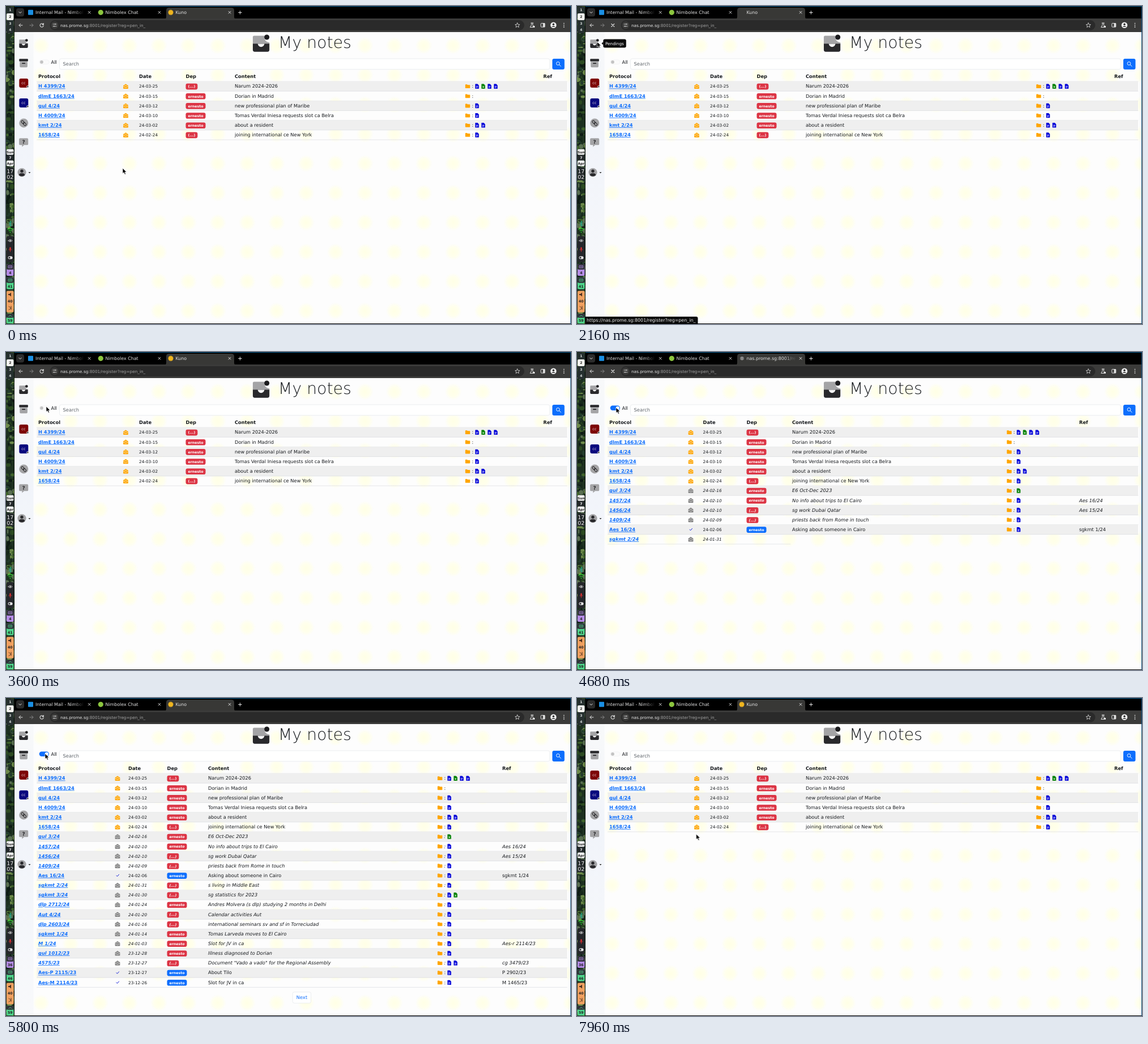
Animation, 998 px wide and 561 px high, one loop 8000 ms. Source, as an HTML page:

```html
<!DOCTYPE html>
<html lang="en">
<head>
<meta charset="utf-8">
<title>My notes</title>
<style>
html, body { margin: 0; width: 100%; height: 100%; overflow: hidden; background: #000; }
svg { display: block; width: 100vw; height: 100vh; font-family: "DejaVu Sans", sans-serif; text-rendering: geometricPrecision; }
text { white-space: pre; }
.b { font-weight: bold; }
.i { font-style: oblique; }
.m { text-anchor: middle; }
.link { font-weight: bold; fill: #0d6efd; text-decoration: underline; }
.title { font-family: "DejaVu Sans Light", "DejaVu Sans", sans-serif; font-weight: 200; }
.part { animation: 8s step-end infinite; }
.six { animation-name: six; }
.twelve { animation-name: twelve; }
.full { animation-name: full; }
.three { animation-name: three; }
.on { animation-name: on; }
.off { animation-name: off; }
.busy { animation-name: busy; }
.idle { animation-name: idle; }
.tip { animation-name: tip; }
.status { animation-name: status; }
.named { animation-name: named; }
.unnamed { animation-name: unnamed; }
.favicon { animation-name: favicon; }
.early { animation-name: early; }
.late { animation-name: late; }
.cursor { animation: cursor 8s ease-in-out infinite; }
@keyframes six { 0%, 89% { visibility: visible } 57.5% { visibility: hidden } }
@keyframes twelve { 0%, 60.5% { visibility: hidden } 57.5% { visibility: visible } }
@keyframes full { 0%, 87% { visibility: hidden } 60.5% { visibility: visible } }
@keyframes three { 0%, 89% { visibility: hidden } 87% { visibility: visible } }
@keyframes on { 0%, 83% { visibility: hidden } 53.25% { visibility: visible } }
@keyframes off { 0%, 83% { visibility: visible } 53.25% { visibility: hidden } }
@keyframes busy { 0%, 32%, 65%, 92.5% { visibility: hidden } 23%, 54%, 83.5% { visibility: visible } }
@keyframes idle { 0%, 32%, 65%, 92.5% { visibility: visible } 23%, 54%, 83.5% { visibility: hidden } }
@keyframes tip { 0%, 33% { visibility: hidden } 19.5% { visibility: visible } }
@keyframes status { 0%, 34% { visibility: hidden } 20% { visibility: visible } }
@keyframes named { 0%, 62% { visibility: visible } 57.5% { visibility: hidden } }
@keyframes unnamed { 0%, 62% { visibility: hidden } 57.5% { visibility: visible } }
@keyframes favicon {
  0%, 32%, 62%, 92.5% { visibility: visible; transform: scale(1) }
  23%, 57.5% { visibility: hidden; transform: scale(1) }
  87% { visibility: visible; transform: scale(.7) }
}
@keyframes early { 0% { visibility: visible } 64% { visibility: hidden } }
@keyframes late { 0% { visibility: hidden } 64% { visibility: visible } }
@keyframes cursor {
  0%, 1% { transform: translate(206px, 286px) }
  18.5%, 33% { transform: translate(35.5px, 63px) }
  42%, 50% { transform: translate(71px, 96px) }
  53%, 93.5% { transform: translate(69px, 98px) }
  98.5%, 100% { transform: translate(210.5px, 240px) }
}
</style>
</head>
<body>
<svg id="stage" viewBox="0 0 998 561" xmlns="http://www.w3.org/2000/svg">
  <defs>
    <radialGradient id="glow">
      <stop offset="0" stop-color="#ffffe6"/><stop offset=".55" stop-color="#ffffec"/><stop offset="1" stop-color="#ffffec" stop-opacity="0"/>
    </radialGradient>
    <pattern id="dots" x="36" y="44" width="52" height="52" patternUnits="userSpaceOnUse">
      <circle cx="26" cy="26" r="15" fill="url(#glow)"/>
    </pattern>
    <linearGradient id="side" x2="0" y2="1">
      <stop offset="0" stop-color="#f8f9fa"/><stop offset=".35" stop-color="#f1f4fa"/><stop offset="1" stop-color="#f8f9fb"/>
    </linearGradient>
    <linearGradient id="fade">
      <stop offset="0" stop-color="#000" stop-opacity="0"/><stop offset="1"/>
    </linearGradient>
    <linearGradient id="fadeTab">
      <stop offset="0" stop-color="#383836" stop-opacity="0"/><stop offset="1" stop-color="#383836"/>
    </linearGradient>
    <clipPath id="strip"><path d="M0 0h14.5v561H0z"/></clipPath>
    <g id="mail">
      <path d="M-4.4-1.3 0-4.3 4.4-1.3V3.3q0 .9-.9.9h-7q-.9 0-.9-.9z"/>
      <path d="M-2.4-1.3h4.8M-4.4.2 0 2.3 4.4.2" fill="none" stroke="#f6f6f6" stroke-width=".7"/>
    </g>
    <path id="folder" d="M-4.2-2.7q0-.7.7-.7h2.3l1 1h3.7q.7 0 .7.7v4.4q0 .7-.7.7h-7q-.7 0-.7-.7z"/>
    <path id="page" d="M-3.2-3.6q0-.6.6-.6H.9L3.3-1.8V3.6q0 .6-.6.6h-5.3q-.6 0-.6-.6z"/>
    <path id="lines" d="M-1.6-.1h3.2M-1.6 1.3h3.2M-1.6 2.6h2" stroke="#fff" stroke-width=".7"/>
    <path id="cross" d="M-1.4-.6 1.4 2.8M1.4-.6-1.4 2.8" stroke="#fff" stroke-width=".8"/>
    <g id="inbox">
      <path d="M-6.5-6.8H3.2A5 5 0 0 0 7.7-.4V1H-7.7V-5.6q0-1.2 1.2-1.2z" fill="#a4a4a6"/>
      <path d="M-7.7.6H-3.2q.8 3 3.2 3t3.2-3H7.7V6.3q0 1.8-1.8 1.8H-5.9q-1.8 0-1.8-1.8z" fill="#29292c"/>
      <circle cx="5.3" cy="-5.4" r="2.4" fill="#1c1c1f"/>
    </g>
  </defs>
</svg>
<script>
const stage = document.getElementById('stage');
const rect = (x, y, w, h, fill, rx = 0, more = '') =>
  `<rect x="${x}" y="${y}" width="${w}" height="${h}" rx="${rx}" fill="${fill}" ${more}/>`;
const disc = (x, y, r, fill) => `<circle cx="${x}" cy="${y}" r="${r}" fill="${fill}"/>`;
const line = (d, stroke, width = 1) =>
  `<path d="${d}" fill="none" stroke="${stroke}" stroke-width="${width}" stroke-linecap="round" stroke-linejoin="round"/>`;
const fillPath = (d, fill) => `<path d="${d}" fill="${fill}"/>`;
const text = (x, y, s, size = 8.32, fill = '#16191d', cls = '') =>
  `<text x="${x}" y="${y}" font-size="${size}" fill="${fill}" class="${cls}">${s}</text>`;
const use = (id, x, y, fill, scale = 1) =>
  `<use href="#${id}" transform="translate(${x} ${y}) scale(${scale})" fill="${fill}"/>`;
const part = (name, body) => `<g class="part ${name}">${body}</g>`;

// Mail state: o = open, g = read (set in italics), c = done.
const notes = `H 4399/24|o|24-03-25||Narum 2024-2026|bgbb|
dlmE 1663/24|o|24-03-15|ernesto|Dorian in Madrid||
gul 4/24|o|24-03-12|ernesto|new professional plan of Maribe|b|
H 4009/24|o|24-03-10|ernesto|Tomas Verdal Iniesa requests slot ca Belra|b|
kmt 2/24|o|24-03-02|ernesto|about a resident|bb|
1658/24|o|24-02-24||joining international ce New York|b|
gul 3/24|g|24-02-16|ernesto|E6 Oct-Dec 2023|g|
1457/24|g|24-02-10|ernesto|No info about trips to El Cairo|b|Aes 16/24
1456/24|g|24-02-10||sg work Dubai Qatar|b|Aes 15/24
1409/24|g|24-02-09||priests back from Rome in touch|b|
Aes 16/24|c|24-02-06|ernesto|Asking about someone in Cairo|b|sgkmt 1/24
sgkmt 2/24|g|24-01-31||s living in Middle East|b|
sgkmt 3/24|g|24-01-30||sg statistics for 2023|bg|
dlp 2712/24|g|24-01-24|ernesto|Andres Molvera (s dlp) studying 2 months in Delhi|b|
Aut 4/24|g|24-01-20||Calendar activities Aut|b|
dlp 2603/24|g|24-01-16||international seminars sv and sf in Torreciudad|b|
sgkmt 1/24|g|24-01-14|ernesto|Tomas Larveda moves to El Cairo|b|
M 1/24|g|24-01-03|ernesto|Slot for JV in ca|b|Aes-r 2114/23
gul 1012/23|g|23-12-28|ernesto|Illness diagnosed to Dorian|b|
4575/23|g|23-12-27||Document "Vado a vado" for the Regional Assembly|bb|cg 3479/23
Aes-P 2115/23|c|23-12-27|ernesto|About Tilo|b|P 2902/23
Aes-M 2114/23|c|23-12-26|ernesto|Slot for JV in ca|b|M 1465/23`
  .split('\n').map(row => row.split('|'));

const rowTop = 133.1, rowHeight = 17.15;
const rule = (y, end = 991) => line(`M54.5 ${y}H${end}`, '#d3d6da', .6);

function badge(x, y, name, state, cls) {
  const width = name ? 35 : 20.9;
  return rect(x, y - 4.9, width, 10.6, state === 'c' ? '#0d6efd' : '#dc3545', 3.1) +
    text(x + width / 2, y + 2.7, name || '(...)', 6.24, '#fff', 'b m' + cls);
}

function noteRow(note, i, cols, cut) {
  const [protocol, state, date, dep, content, docs, ref] = note;
  const y = rowTop + rowHeight * (i + .5), base = y + 2.8;
  const cls = state === 'g' ? ' i' : '';
  let out = i % 2 ? '' : rect(54.5, y - rowHeight / 2, 936.5, rowHeight, '#efefef');
  out += text(57, base, protocol, 8.32, '#0d6efd', 'link' + cls);
  out += state === 'c'
    ? line(`M${cols.mail - 2} ${y}l1.5 1.6 3-3.4`, '#1420d8', 1)
    : use('mail', cols.mail, y, state === 'o' ? '#ffa500' : '#808080');
  out += text(cols.date, base, date, 7.3, '#16191d', cls);
  if (cut) return out + rule(y + rowHeight / 2, 377);
  out += badge(cols.dep, y, dep, state, cls);
  out += text(cols.content, base, content, 8.32, '#16191d', cls);
  out += use('folder', cols.folder, y, '#ffa500') + text(cols.folder + 7.2, base, ':', 8.32, '#16191d', cls);
  [...docs].forEach((kind, k) => {
    const x = cols.folder + 16.5 + 11 * k;
    out += use('page', x, y, kind === 'b' ? '#0000d8' : '#008000') + use(kind === 'b' ? 'lines' : 'cross', x, y);
  });
  return out + text(cols.ref, base, ref, 8.32, '#16191d', cls) + rule(y + rowHeight / 2);
}

function table(name, count, [mail, date, dep, content, folder, ref], extra = '', cutLast = false) {
  const cols = { mail, date, dep, content, folder, ref };
  const heads = [[57, 'Protocol'], [date, 'Date'], [dep, 'Dep'], [content, 'Content'], [ref, 'Ref']];
  return part(name,
    heads.map(([x, s]) => text(x, 127.4, s, 8.32, '#16191d', 'b')).join('') + rule(rowTop) +
    notes.slice(0, count).map((n, i) => noteRow(n, i, cols, cutLast && i === count - 1)).join('') + extra);
}

function sideStrip() {
  let seed = 7;
  const random = () => (seed = seed * 16807 % 2147483647) / 2147483647;
  const greens = ['#16281a', '#2c4a22', '#40632c', '#0d1a14', '#5a6f52', '#233c2c', '#6d8a4a'];
  let out = rect(0, 0, 15, 561, '#1d3020');
  for (let i = 0; i < 260; i++) {
    out += `<ellipse cx="${random() * 15}" cy="${random() * 561}" rx="${1 + random() * 4}" ry="${1 + random() * 4}" fill="${greens[random() * 7 | 0]}"/>`;
  }
  const label = (y, s, fill, size = 6.2) => text(7.3, y, s, size, fill, 'b m');
  const pill = (y, h, fill) => rect(1, y, 12.5, h, fill, 2);
  out += pill(1, 47, '#26302f') + pill(13, 12, '#f4f4f0');
  ['1', '2', '3', '4'].forEach((s, i) => out += label(9 + i * 11.8, s, i === 1 ? '#222' : '#d8dcda', 6));
  out += pill(252.5, 10, '#f4f4f4') + label(259.5, 'Sun', '#222', 5.8) + pill(263, 9.5, '#23282a') + label(270, '7', '#fff') +
    pill(272.5, 10, '#f4f4f4') + label(279.5, 'Apr', '#222', 5.8);
  out += pill(284.5, 23, '#23282a') + text(7.3, 294.8, '17', 9.5, '#eee', 'm') + text(7.3, 304.6, '02', 9.5, '#eee', 'm');
  out += line('M5 381.5l5 5-2.5 2.5v-10l2.5 2.5-5 5', '#1fae8d', 1) + line('M3 394q4.5-4 9 0M5 396.5q2.5-2 5 0', '#2bd02b', 1.2) + disc(7.5, 399, 1, '#2bd02b');
  out += pill(406, 46, '#25272b') + line('M4 414q3.5-4 7 0-3.5 4-7 0z', '#ddd', .8) + disc(7.5, 414, 1.2, '#ddd');
  out += rect(6.3, 425.5, 2.4, 5, '#e03030', 1.2) + line('M5 429.5q2.5 4 5 0M7.5 431.5v2', '#e03030', .8);
  out += rect(3.5, 441.5, 8, 5, '#eee', 2.5) + disc(6, 444, 1.6, '#25272b');
  const meter = (y, color) => pill(y, 21, color) + pill(y, 10, '#30323a') + line(`M4.5 ${y + 3}h6v4h-6zM6 ${y + 5}h3`, color, .8);
  out += meter(455, '#b58ce6') + meter(478.5, '#4fd58c');
  out += part('early', label(473, '4', '#222') + label(496.7, '41', '#222')) + part('late', label(473, '36', '#222') + label(496.7, '46', '#222'));
  out += pill(502.5, 38, '#f0a060') + fillPath('M4 508h2l3-2.5v7L6 510H4z', '#4a3020') + label(523.2, '40', '#222') + line('M5 530l4 3-4 3M9 529.5v6', '#4a3020', .9);
  out += pill(543, 17, '#4fd58c') + pill(543, 7, '#30323a') + line('M4.5 548q3-4 6 0', '#4fd58c', .9) + label(557, '59', '#222');
  return `<g clip-path="url(#strip)">${out}</g>`;
}

function browser() {
  const white = '#e3e3e3', grey = '#a3a3a3';
  const close = (x, y, r, w = .9) => line(`M${x - r} ${y - r}l${2 * r} ${2 * r}m0 ${-2 * r}l${-2 * r} ${2 * r}`, white, w);
  let out = rect(14.5, 0, 983.5, 561, '#000') + rect(15, 0, 983, 1, '#0a5f93') + rect(997, 0, 1, 561, '#0a4a78');
  out += rect(18, 4, 14, 14.5, '#2b2b2b', 4) + line('M22.8 10.3l2.2 2.2 2.2-2.2', white);
  out += rect(39, 6.7, 9, 9, '#1a8fe3', 1) + text(52, 14, 'Internal Mail - Nimbol', 7.9, white) + rect(118, 4, 20, 15, 'url(#fade)') + rect(138, 4, 4, 15, '#000');
  out += disc(167.3, 11.3, 4.6, '#8cc63f') + text(175.5, 14, 'Nimbolex Chat', 7.9, white);
  out += fillPath('M279 23q4 0 4-4V8q0-5 5-5h110q5 0 5 5v11q0 4 4 4z', '#383836');
  out += `<g transform="translate(291 11.3)">${part('favicon', disc(0, 0, 4.5, '#efb51f'))}</g>`;
  out += part('named', text(299.5, 14, 'Kuno', 7.9, white));
  out += part('unnamed', disc(291.5, 11.3, 3.3, '#777') + line('M288.8 10h5M289 13h5M291.5 8.5v5.5', '#aaa', .5) +
    text(299.5, 14, 'nas.prome.sg:8001/re', 7.9, white) + rect(366, 4, 21, 15, 'url(#fadeTab)') + rect(387, 4, 15, 15, '#383836'));
  out += [147.3, 271, 395].map(x => close(x, 11.3, 2)).join('') + line('M410.7 11.5h5.4M413.4 8.8v5.4', white);

  out += rect(15, 22, 982, 24, '#3b3b3a') + rect(77.5, 25, 838, 18, '#2a2a2a', 9);
  out += line('M29 34h-6m2.7-2.8L22.9 34l2.8 2.8', white) + line('M42 34h6m-2.7-2.8L48.1 34l-2.8 2.8', '#858585');
  out += part('idle', line('M65.9 32.6A3.1 3.1 0 1 0 66.2 34.8M66.3 30.6v2.3H64', white, 1.1)) + part('busy', close(63.3, 34, 2.5, 1.1));
  out += disc(86, 33.8, 6.5, '#3b3b3a') + line('M83 32h2.6M88.2 32h.8M83 35.7h.8M86.4 35.7H89', white, .8) + disc(87, 32, .9, white) + disc(85, 35.7, .9, white);
  out += `<text x="96" y="36.6" font-size="7.28" fill="${white}">nas.prome.sg<tspan fill="${grey}">:8001/register?reg=pen_in_</tspan></text>`;
  out += line('M903.3 29.8l1.2 2.7 2.9.3-2.2 1.9.7 2.9-2.6-1.6-2.6 1.6.7-2.9-2.2-1.9 2.9-.3z', white, .8);
  out += line('M927.3 30h4M928.2 30.2v3l-2.4 4.3h7l-2.4-4.3v-3', white, 1) + rect(930.5, 35, 3.5, 3, white);
  out += rect(944.8, 30.5, 7, 6.6, 'none', .8, `stroke="${white}"`) + rect(948.5, 30.5, 3.3, 6.6, white);
  out += disc(967, 33.7, 5.3, '#f2f2f2') + disc(967, 32.2, 1.7, '#222') + fillPath('M963.6 36.8q3.4-3.6 6.8 0z', '#222');
  return out + [30.6, 33.8, 37].map(y => disc(985.5, y, .9, white)).join('');
}

function sidebar() {
  let out = rect(15, 46, 33.5, 514, 'url(#side)');
  out += use('inbox', 31, 66);
  out += rect(23.3, 93.3, 15.6, 4.4, '#29292c', 1) + fillPath('M24.3 98.5h13.6v8q0 1.8-1.8 1.8h-10q-1.8 0-1.8-1.8z', '#a4a4a6') + rect(28, 100.3, 6.2, 1.6, '#29292c', .8);
  const square = (y, fill) => rect(23.3, y - 8, 16, 16, fill, 3) + text(31, y + 2.3, 'cc', 6.6, '#e5d8dc', 'm') +
    disc(38.3, y + 6.2, 2, '#f4f5f8') + disc(38.3, y + 6.2, 1.3, '#444');
  out += square(136, '#7d0505') + square(171, '#07077e');
  out += disc(31.3, 206.4, 8, '#a4a4a6') + '<g transform="rotate(45 31.3 206.4)">' +
    rect(26, 204.6, 6, 3.8, 'none', 1.9, 'stroke="#29292c" stroke-width="1.1"') + rect(30.8, 204.6, 6, 3.8, 'none', 1.9, 'stroke="#29292c" stroke-width="1.1"') + '</g>';
  out += fillPath('M25 233.3h12.3q1.9 0 1.9 1.9v8.2q0 1.9-1.9 1.9H32l-3.7 3.3v-3.3H25q-1.9 0-1.9-1.9v-8.2q0-1.9 1.9-1.9z', '#a4a4a6') + text(31.2, 242.7, '?', 9, '#29292c', 'b m');
  out += disc(28, 293.6, 7.6, '#a4a4a6') + disc(28, 291.2, 2.7, '#29292c') + fillPath('M22.8 298.5q0-3.4 5.2-3.4t5.2 3.4q-5.2 3.8-10.4 0z', '#29292c');
  return out + fillPath('M39.5 293h4l-2 2.2z', '#333');
}

function header() {
  let out = use('inbox', 450.6, 65.3, '#000', 1.9) + text(481, 74, 'My notes', 28.4, '#16191d', 'title');
  out += part('off', rect(59, 95, 17, 7.6, '#fbfbfb', 3.8, 'stroke="#e9ebed" stroke-width=".5"') + disc(63, 98.8, 2.9, '#c3c3c3'));
  out += part('on', rect(58.7, 94.6, 17.2, 8.4, '#0d6efd', 4.2) + disc(71.8, 98.8, 3, '#fff'));
  out += text(79.5, 101.6, 'All') + rect(94.5, 93, 866, 18.7, '#fff', 3, 'stroke="#dee2e6" stroke-width=".6"');
  out += text(100.5, 105, 'Search', 8.32, '#60666c');
  out += rect(965, 93, 21.5, 19, '#0d6efd', 3) + '<circle cx="975" cy="101.4" r="2.9" fill="none" stroke="#fff" stroke-width=".9"/>';
  return out + line('M977.2 103.6l2.8 2.8', '#fff', 1);
}

const next = rect(506.3, 518.7, 32.4, 19.6, '#fff', 3, 'stroke="#dee2e6" stroke-width=".6"') + text(522.5, 531.4, 'Next', 8.32, '#0d6efd', 'm');
const tip = rect(46.3, 58.5, 40.5, 15, '#0c0c0c', 3) + fillPath('M46.5 63.2v5.6L43.4 66z', '#0c0c0c') + text(50, 68.6, 'Pendings', 7.28, '#fff');
const status = fillPath('M15 548h195.5q3 0 3 3v9H15z', '#0c0c0c') + text(17, 556.8, 'https://nas.prome.sg:8001/register?reg=pen_in_', 7.94, '#eee');
const arrow = '<path class="cursor" d="M0 0v9.6l2.2-2 1.6 3.6 1.7-.8L4 7h3z" fill="#000" stroke="#fff" stroke-width=".7"/>';

stage.insertAdjacentHTML('beforeend', [
  sideStrip(),
  browser(),
  rect(15, 46, 982, 514, '#fdfdfd'), rect(48.5, 46, 948.5, 514, 'url(#dots)'),
  sidebar(),
  header(),
  table('six', 6, [211.5, 235, 317.5, 404, 815.5, 949]),
  table('twelve', 12, [201, 222.5, 299.5, 380, 763.5, 887], '', true),
  table('full', 22, [197, 216, 284.5, 357, 766.5, 876.5], next),
  table('three', 3, [231.5, 259, 352, 450, 792, 943], rule(189, 226)),
  part('tip', tip),
  part('status', status),
  arrow
].join(''));
</script>
</body>
</html>
```
